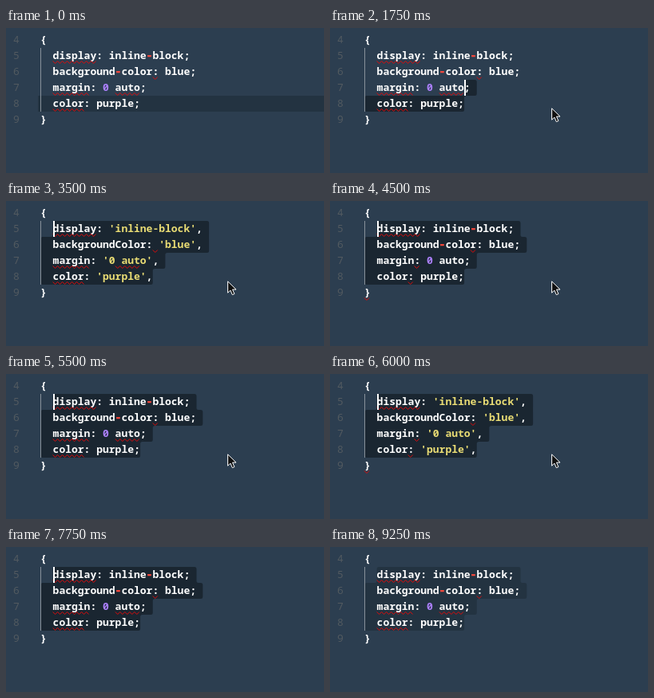
An HTML page for the animation above (9.75 s loop, 398 px wide and 182 px high).

```html
<!DOCTYPE html>
<html lang="en">
<head>
<meta charset="utf-8">
<title>CSS and JS object toggle</title>
<style>
html, body { margin: 0; width: 100%; height: 100%; overflow: hidden; background: #2c3e50; }
svg { display: block; }
text { font: 700 13px "Noto Sans Mono", "DejaVu Sans Mono", monospace; white-space: pre; fill: #fff; }
.number { fill: #525a60; font-weight: 400; }
.minus { fill: #ff4a3d; stroke: #ff4a3d; stroke-width: .6px; }
.digit { fill: #ae81ff; }
.string { fill: #e9dc74; }
</style>
</head>
<body>
<svg width="398" height="182" viewBox="0 0 398 182">
  <rect width="398" height="182" fill="#2c3e50"/>
  <rect id="activeLine" x="40" y="85" width="358" height="20" fill="#233341"/>
  <path id="selection"/>
  <path d="M43.5 25V105" stroke="#87919a"/>
  <g id="numbers"></g>
  <g id="code"></g>
  <path id="squiggles" fill="none" stroke="#e00b0b"/>
  <rect id="caret" width="2" height="20" fill="#fff"/>
  <path id="pointer" d="M.6 .9V15.2L3.9 12.1L6.3 17.7L8.9 16.6L6.5 11.1H11Z" fill="#111" stroke="#fff"/>
</svg>
<script>
const LOOP = 9750, STEP = 250, CHAR = 7.82, ROW = 20, INDENT = 58.6, MARGIN = 43.5;
const $ = id => document.getElementById(id);
const rowTop = line => (line - 4) * ROW + 5;
const column = n => INDENT + n * CHAR;

const css = ["display: inline-block;", "background-color: blue;", "margin: 0 auto;", "color: purple;"];
const js = ["display: 'inline-block',", "backgroundColor: 'blue',", "margin: '0 auto',", "color: 'purple',"];

// Each warning is [line, first column, length].
const cssWarnings = [[5, 0, 7], [6, 16, 1], [7, 0, 6], [7, 10, 4], [8, 0, 5]];
const jsWarnings = [[5, 0, 7], [6, 15, 1], [7, 6, 1], [8, 5, 1], [9, -2, 1]];

const textAt = (x, line, content, type = "") =>
  `<text x="${x}" y="${rowTop(line) + 14}" class="${type}">${content}</text>`;

const highlight = source => source.replace(/'[^']*'|-|\b0\b/g, token => {
  const type = token[0] === "'" ? "string" : token === "-" ? "minus" : "digit";
  return `<tspan class="${type}">${token}</tspan>`;
});

const codeMarkup = lines => textAt(43, 4, "{") +
  lines.map((source, i) => textAt(INDENT, i + 5, highlight(source))).join("") +
  textAt(43, 9, "}");

function squiggle([line, start, length]) {
  const x = column(start), y = rowTop(line) + 16.5;
  let d = `M${x} ${y}`;
  for (let dx = 3, low = true; dx <= length * CHAR + 1; dx += 3, low = !low) d += `L${x + dx} ${y + (low ? 3 : 0)}`;
  return d;
}

function roundedPath(points, radius) {
  const corners = points.filter((p, i) => {
    const q = points[(i + 1) % points.length];
    return Math.hypot(q[0] - p[0], q[1] - p[1]) > 0.1;
  });
  const toward = (p, q) => {
    const length = Math.hypot(q[0] - p[0], q[1] - p[1]);
    const k = Math.min(radius, length / 2) / length;
    return [p[0] + (q[0] - p[0]) * k, p[1] + (q[1] - p[1]) * k];
  };
  return corners.map((p, i) => {
    const before = corners.at(i - 1), after = corners[(i + 1) % corners.length];
    return `${i ? "L" : "M"}${toward(p, before)}Q${p} ${toward(p, after)}`;
  }).join("") + "Z";
}

function selectionPath(lines, startLine, startX) {
  const right = [], left = [];
  for (let line = startLine; line <= 8; line++) {
    const x0 = line === startLine ? startX : MARGIN;
    const x1 = column(lines[line - 5].length + (line < 8 ? 1 : 0));
    const top = rowTop(line), bottom = top + ROW;
    right.push([x1, top], [x1, bottom]);
    left.unshift([x0, bottom], [x0, top]);
  }
  return roundedPath([...right, ...left], 2.5);
}

const within = (t, ...spans) => spans.some(([from, to]) => t >= from && t < to);

function pointerAt(t) {
  if (t < 500 || t >= 7750) return null;
  if (t < 750) return [362, 17];
  return t < 7500 ? [277, 100] : [262, 9];
}

function caretAt(t) {
  const endX = Math.floor(column(14));
  if (t < 1750) return t >= 1250 ? [endX, 8] : null;
  if (t < 2500) return [endX, 7 - Math.floor((t - 1750) / STEP)];
  const shown = within(t, [2500, 3000], [3500, 4000], [4500, 5000], [5500, 6250], [6750, 7250], [7750, 8250], [8750, 9250]);
  return shown ? [59, 5] : null;
}

function show(element, visible) {
  element.setAttribute("visibility", visible ? "visible" : "hidden");
}

function place(element, position) {
  show(element, position);
  if (position) element.setAttribute("transform", `translate(${position})`);
}

function draw(time) {
  const t = Math.floor((time % LOOP) / STEP) * STEP;
  const lines = within(t, [3500, 4500], [5750, 6750]) ? js : css;
  // Lint marks lag one step behind the text.
  const warnings = within(t, [3750, 4750], [6000, 7000]) ? jsWarnings : cssWarnings;
  $("code").innerHTML = codeMarkup(lines);
  $("squiggles").setAttribute("d", warnings.map(squiggle).join(""));

  const selected = t >= 1750;
  show($("activeLine"), !selected);
  show($("selection"), selected);
  if (selected) {
    const startLine = t < 2500 ? 7 - Math.floor((t - 1750) / STEP) : 5;
    $("selection").setAttribute("d", selectionPath(lines, startLine, t < 2500 ? column(14) : INDENT));
    $("selection").setAttribute("fill", t < 9250 ? "#1a2631" : "#233341");
  }

  const caret = caretAt(t);
  place($("caret"), caret && [caret[0], rowTop(caret[1])]);
  place($("pointer"), pointerAt(t));
}

$("numbers").innerHTML = [4, 5, 6, 7, 8, 9].map(n => textAt(9, n, n, "number")).join("");

let shownStep = -1;
function tick() {
  const now = performance.now(), step = Math.floor(now / STEP);
  if (step !== shownStep) draw(now);
  shownStep = step;
  requestAnimationFrame(tick);
}
tick();
</script>
</body>
</html>
```
